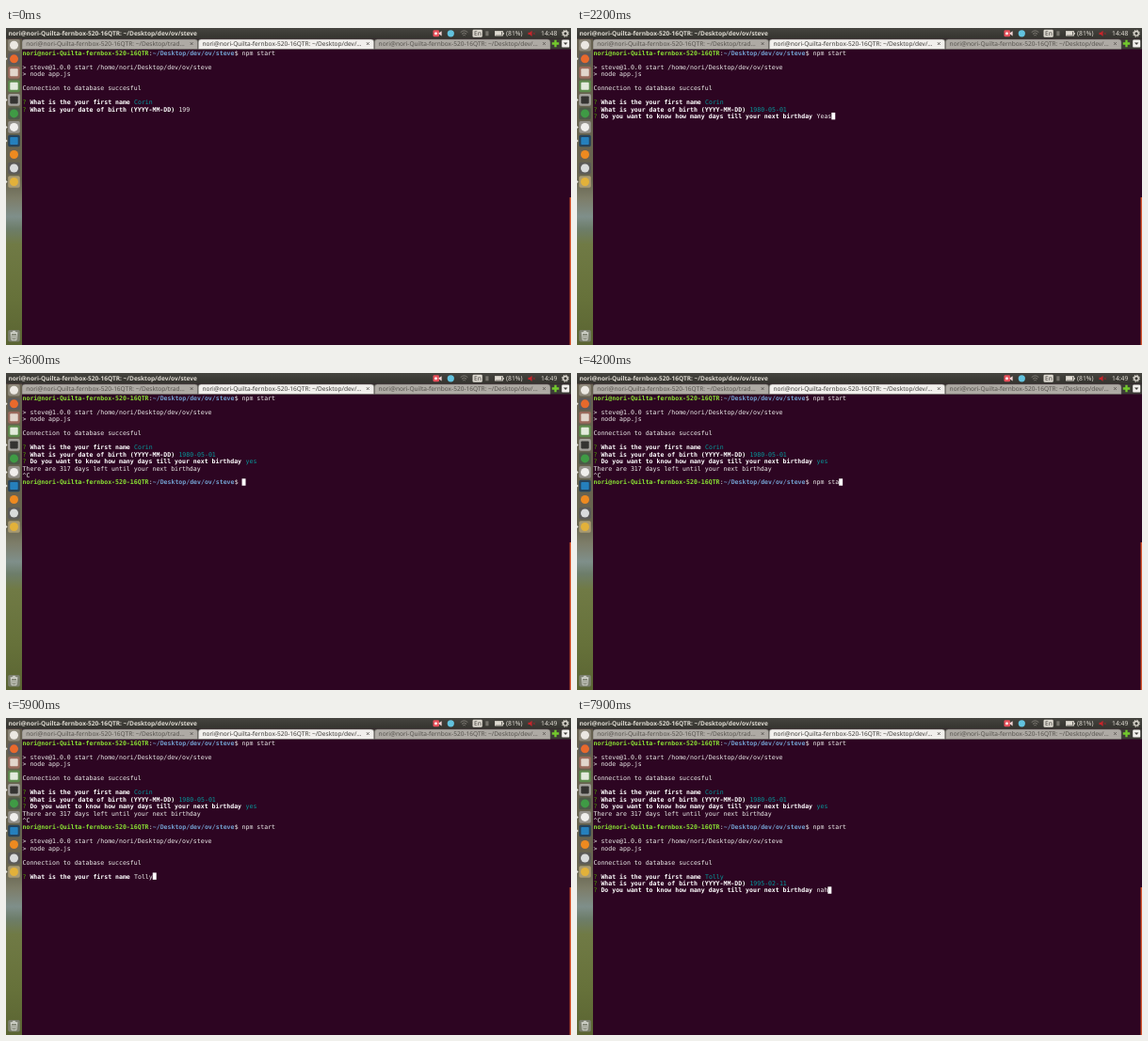
An HTML page for the animation above (8 s loop, 600 by 337 pixels).

```html
<!DOCTYPE html>
<html lang="en">
<head>
<meta charset="utf-8">
<title>Terminal session</title>
<style>
html, body { margin: 0; width: 100%; height: 100%; overflow: hidden; background: #2d0522; }
svg { display: block; width: 100vw; height: 100vh; }
text { white-space: pre; text-rendering: geometricPrecision; }
.ui { font: 6.55px "Noto Sans", "Open Sans", sans-serif; fill: #55524d; }
.active { fill: #3f3d3a; }
.bar { font-size: 6.8px; fill: #dfdbd2; }
.title { font-weight: 700; fill: #e0dcd3; }
#screen { font: 6.56px "DejaVu Sans Mono", "Liberation Mono", monospace; fill: #eeeeec; }
.user { fill: #8ae234; font-weight: 700; }
.path { fill: #729fcf; font-weight: 700; }
.ask { fill: #fff; font-weight: 700; }
.mark { fill: #4e9a06; }
.answer { fill: #06989a; }
</style>
</head>
<body>
<svg viewBox="0 0 600 337" preserveAspectRatio="none">
  <defs>
    <linearGradient id="field" x2="0" y2="1">
      <stop offset="0" stop-color="#66604f"/>
      <stop offset=".46" stop-color="#68654f"/>
      <stop offset=".52" stop-color="#7d7d69"/>
      <stop offset=".58" stop-color="#7f8f8a"/>
      <stop offset=".62" stop-color="#6d7d6a"/>
      <stop offset=".67" stop-color="#707a45"/>
      <stop offset=".85" stop-color="#66713a"/>
      <stop offset="1" stop-color="#5a6432"/>
    </linearGradient>
    <linearGradient id="panel" x2="0" y2="1">
      <stop offset="0" stop-color="#45443f"/>
      <stop offset="1" stop-color="#34332e"/>
    </linearGradient>
  </defs>

  <rect width="600" height="337" fill="#2d0522"/>
  <rect x="598.6" y="180" width="1.4" height="157" fill="#d9572f"/>

  <!-- top bar -->
  <rect width="600" height="11.5" fill="url(#panel)"/>
  <text class="ui title" x="2.4" y="8" id="title"></text>
  <rect x="453.5" y="2.3" width="6.5" height="7" rx="1.3" fill="#e8505b"/>
  <path d="M459 5.8l3.6-2.6v5.2z" fill="#f3d5d5"/>
  <circle cx="456.5" cy="5.8" r="1.5" fill="#fbe9e9"/>
  <circle cx="472.3" cy="5.8" r="3.6" fill="#62c3df"/>
  <g fill="none" stroke="#85827b" stroke-width=".9">
    <path d="M482.7 4.6q3.8-3.4 7.6 0M484 6.3q2.5-2.2 5 0M485.3 8q1.2-1 2.4 0"/>
  </g>
  <rect x="495.5" y="1.8" width="10.3" height="8" rx="1.2" fill="#dcd8cf"/>
  <text class="ui" x="497" y="8" style="fill:#3a3935">En</text>
  <rect x="509.3" y="3.3" width="3.2" height="5" fill="#77746d"/>
  <rect x="519.5" y="3.6" width="8" height="4.4" fill="none" stroke="#dfdbd2" stroke-width=".9"/>
  <path d="M520 4h6.3v3.6h-6.3zM527.7 5h1.1v1.7h-1.1z" fill="#dfdbd2"/>
  <text class="ui bar" x="531" y="8.2">(81%)</text>
  <path d="M554.5 4.7h1.8l2.2-2v6.4l-2.2-2h-1.8z" fill="#c8242a"/>
  <path d="M559.5 4.5l2.4 2.6m0-2.6l-2.4 2.6" stroke="#8f2a2c" stroke-width=".8"/>
  <text class="ui bar" x="568" y="8.2" id="clock">14:48</text>
  <circle cx="594" cy="5.8" r="2.3" fill="none" stroke="#dfdbd2" stroke-width="1.4"/>
  <circle cx="594" cy="5.8" r="3.5" fill="none" stroke="#dfdbd2" stroke-width="1" stroke-dasharray="1.37"/>

  <!-- tabs -->
  <rect x="17" y="11.5" width="583" height="11" fill="#3d3b37"/>
  <g id="tabs"></g>
  <path d="M583.5 12.8v7.4m-3.7-3.7h7.4" stroke="#73c92d" stroke-width="2.3"/>
  <rect x="590.2" y="12.6" width="8" height="8" rx="1.2" fill="#f1efec"/>
  <path d="M592 15.4h4.4l-2.2 2.6z" fill="#44423e"/>

  <!-- launcher -->
  <rect y="11.5" width="17" height="326" fill="url(#field)"/>
  <g id="dock"></g>
  <rect x="2.2" y="321" width="12.6" height="12.6" rx="1.8" fill="#7c806f"/>
  <g fill="none" stroke="#e3e4de" stroke-width=".9">
    <path d="M5.3 324.5h6.4l-.8 7.3h-4.8zM4.6 323.9h7.8M7.4 323.4v-1h2.2v1M7.4 326.2l.3 4m1.9-4l-.3 4"/>
  </g>

  <g id="screen"></g>
</svg>
<script>
const LOOP = 8000, STEP = 100;
const LEFT = 17.5, BASE = 29, CHAR = 3.95, LINE = 7.45;
const HOST = 'nori@nori-Quilta-fernbox-520-16QTR';
const DIR = '~/Desktop/dev/ov/steve';

const $ = id => document.getElementById(id);

function add(parent, tag, attrs, text) {
  const el = document.createElementNS('http://www.w3.org/2000/svg', tag);
  for (const key in attrs) el.setAttribute(key, attrs[key]);
  if (text) el.textContent = text;
  parent.append(el);
  return el;
}

function drawTabs() {
  ['~/Desktop/trad...', '~/Desktop/dev/...', '~/Desktop/dev/...'].forEach((dir, i) => {
    const x = 17 + i * 187.2, active = i === 1, tabs = $('tabs');
    add(tabs, 'path', {
      d: `M${x} 22.5v-7.5q0-3 3-3h180.6q3 0 3 3v7.5z`,
      fill: active ? '#f1efec' : '#aeaaa4', stroke: '#65625d', 'stroke-width': .5
    });
    add(tabs, 'text', { class: active ? 'ui active' : 'ui', x: x + 4.2, y: 19 }, `${HOST}: ${dir}`);
    add(tabs, 'path', {
      d: `M${x + 178.8} 15.3l2.6 2.6m0-2.6l-2.6 2.6`, stroke: '#55524e', 'stroke-width': .9
    });
  });
}

function drawDock() {
  // tile colour, symbol shape, symbol colour
  const icons = [
    ['#8f897b', 'circle', '#ebe8e2'], ['#5c5a5c', 'circle', '#e8692c'],
    ['#9a6a5c', 'rect', '#e2d6cc'], ['#5d8a4c', 'rect', '#e3ebdc'],
    ['#a3a19c', 'rect', '#343331'], ['#4c5a48', 'circle', '#3f9b45'],
    ['#94918b', 'circle', '#f0eeec'], ['#27435a', 'rect', '#2580bd'],
    ['#6b6350', 'circle', '#ee8a20'], ['#5b5a58', 'circle', '#d9dbdc'],
    ['#a89a72', 'circle', '#e2b13a']
  ];
  const dock = $('dock');
  icons.forEach(([tile, shape, color], i) => {
    const y = 18.3 + i * 14.52;
    add(dock, 'rect', { x: 2.2, y: y - 6.3, width: 12.6, height: 12.6, rx: 1.8, fill: tile });
    add(dock, shape, shape === 'circle'
      ? { cx: 8.5, cy: y, r: 4.5, fill: color }
      : { x: 4.3, y: y - 4, width: 8.4, height: 8, rx: .8, fill: color });
    if ([1, 4, 6, 7, 10].includes(i))
      add(dock, 'path', { d: `M0 ${y - 1.5}l1.6 1.5l-1.6 1.5z`, fill: '#e9e6e0' });
  });
}

const type = (t, start, text, pace = 100) =>
  text.slice(0, Math.max(0, Math.floor((t - start) / pace) + 1));

const plain = text => [['', text]];
const prompt = command => [['user', HOST], ['', ':'], ['path', DIR], ['', '$ ' + command]];
const ask = (question, reply, done) =>
  [['mark', '?'], ['ask', ` ${question} `], [done ? 'answer' : '', reply]];

const NAME = 'What is the your first name';
const BIRTH = 'What is your date of birth (YYYY-MM-DD)';
const DAYS = 'Do you want to know how many days till your next birthday';
const START = [[], plain('> steve@1.0.0 start /home/nori/Desktop/dev/ov/steve'), plain('> node app.js'), []];
const READY = [plain('Connection to database succesful'), []];

function rowsAt(t) {
  const firstDate = t < 100 ? '199' : t < 200 ? '19' : type(t, 200, '1980-05-01');
  const rows = [prompt('npm start'), ...START, ...READY,
    ask(NAME, 'Corin', true), ask(BIRTH, firstDate, t >= 1200)];
  const from = (time, ...more) => { if (t >= time) rows.push(...more); };

  const yes = type(t, 1400, 'Yea', 200) + type(t, 2200, 'ssss');
  from(1200, ask(DAYS, t < 2700 ? yes : 'yes', t >= 2700));
  from(2700, plain('There are 317 days left until your next birthday'),
    plain(t < 3400 ? '' : '^C'));
  from(3500, prompt(type(t, 3700, 'npm start', 80)));
  from(4500, ...START);
  from(4600, ...READY);
  from(4700, ask(NAME, type(t, 5200, 'Tolly', 160), t >= 6100));
  from(6100, ask(BIRTH, type(t, 6300, '1995') + type(t, 6800, '-02-11'), t >= 7400));
  from(7400, ask(DAYS, type(t, 7600, 'nah', 150), false));
  return rows;
}

const cursorHidden = t => t < 100 || (t >= 3100 && t < 3200) || (t >= 4500 && t < 5000);

function draw(t) {
  const screen = $('screen');
  screen.replaceChildren();
  let x, y;
  rowsAt(t).forEach((row, i) => {
    x = LEFT;
    y = BASE + i * LINE;
    for (const [style, text] of row) {
      add(screen, 'text', { class: style, x, y }, text);
      x += text.length * CHAR;
    }
  });
  if (!cursorHidden(t)) add(screen, 'rect', { x, y: y - 6.1, width: CHAR, height: 7.4, fill: '#fff' });
  $('clock').textContent = t < 3400 ? '14:48' : '14:49';
}

$('title').textContent = `${HOST}: ${DIR}`;
drawTabs();
drawDock();

const began = performance.now();
let shown = -1;
function tick() {
  const elapsed = Math.max(0, performance.now() - began) % LOOP;
  const t = Math.floor(elapsed / STEP) * STEP;
  if (t !== shown) draw(shown = t);
  requestAnimationFrame(tick);
}
tick();
</script>
</body>
</html>
```
